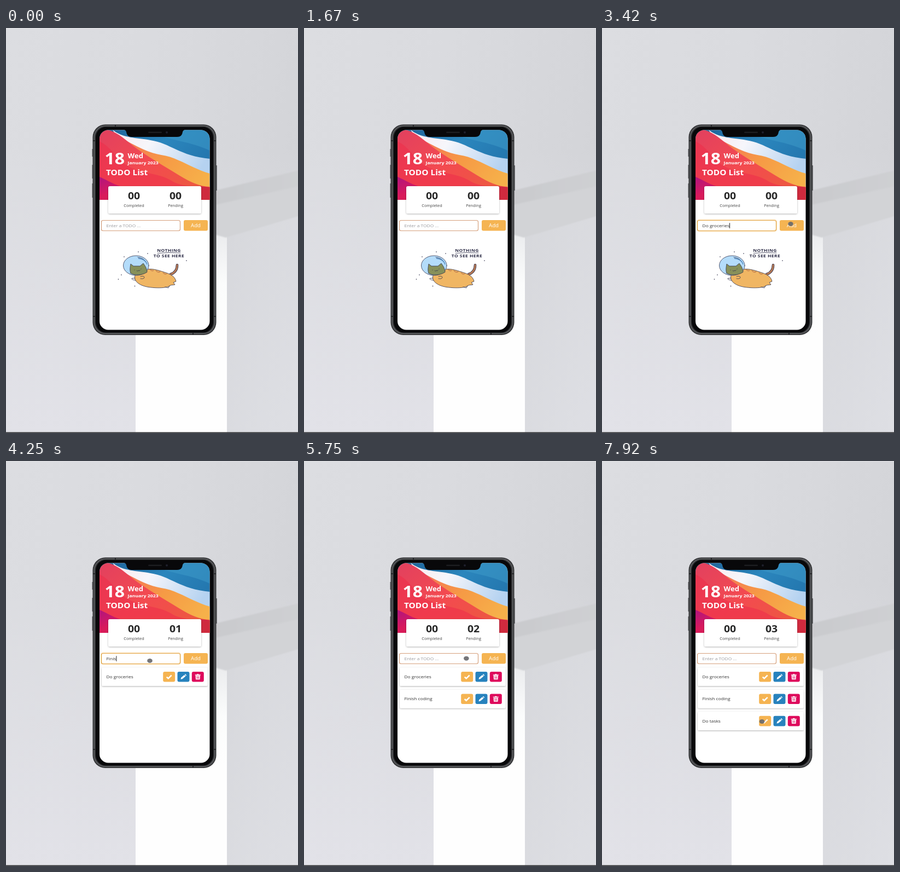
Animation, 534 px wide and 740 px high, one loop 8 s. Source, as an HTML page:

```html
<!DOCTYPE html>
<html lang="en">
<head>
<meta charset="utf-8">
<title>Todo list on a phone</title>
<style>
html, body { margin: 0; width: 100%; height: 100%; overflow: hidden; background: #dcdde1; }
svg { display: block; width: 534px; height: 740px; }
text { font-family: "Open Sans", "Noto Sans", sans-serif; white-space: pre; }
.ink { stroke: #34344e; stroke-width: .8; stroke-linecap: round; stroke-linejoin: round; }
.line { fill: none; }
</style>
</head>
<body>
<svg viewBox="0 0 534 740">
  <defs>
    <linearGradient id="wall" x2="1" y2=".35">
      <stop stop-color="#dcdde1"/><stop offset=".45" stop-color="#dadbdf"/><stop offset="1" stop-color="#d3d4d8"/>
    </linearGradient>
    <linearGradient id="low" x2="0" y2="1">
      <stop offset=".3" stop-color="#e2e2e8" stop-opacity="0"/><stop offset="1" stop-color="#e2e2e8"/>
    </linearGradient>
    <linearGradient id="beam" x2="1"><stop stop-color="#c9cacd"/><stop offset="1" stop-color="#cfd0d3"/></linearGradient>
    <linearGradient id="pillar" x2="1" y2="1"><stop stop-color="#d6d7db"/><stop offset="1" stop-color="#dedfe4"/></linearGradient>
    <linearGradient id="door" x2="0" y2="1"><stop stop-color="#ebecee"/><stop offset=".25" stop-color="#fbfcfc"/><stop offset=".5" stop-color="#fefefe"/></linearGradient>
    <linearGradient id="sky" x2="1" y2=".6"><stop stop-color="#1c5f95"/><stop offset=".5" stop-color="#2b86bd"/><stop offset="1" stop-color="#2273ab"/></linearGradient>
    <linearGradient id="foam" x2="1" y2=".4"><stop stop-color="#fbe9ee"/><stop offset=".4" stop-color="#f6f6fb"/><stop offset="1" stop-color="#b5d2f0"/></linearGradient>
    <linearGradient id="sun" x2="1" y2=".6"><stop stop-color="#f4705a"/><stop offset=".5" stop-color="#f69a45"/><stop offset="1" stop-color="#f6b14a"/></linearGradient>
    <linearGradient id="coral" x2="1" y2=".8"><stop stop-color="#e2405f"/><stop offset=".5" stop-color="#f34a50"/><stop offset="1" stop-color="#ec5a3e"/></linearGradient>
    <linearGradient id="berry" x2="1" y2=".5"><stop stop-color="#b0147f"/><stop offset=".35" stop-color="#d91a5c"/><stop offset="1" stop-color="#cf2a3e"/></linearGradient>
    <filter id="shade" x="-10%" y="-25%" width="120%" height="160%">
      <feDropShadow dx="0" dy="1" stdDeviation="1.6" flood-opacity=".3"/>
    </filter>
    <filter id="soft"><feGaussianBlur stdDeviation=".8"/></filter>
    <clipPath id="screen"><rect x="171" y="186.500" width="201.500" height="365" rx="16"/></clipPath>
  </defs>

  <!-- room -->
  <rect width="534" height="740" fill="url(#wall)"/>
  <rect width="534" height="740" fill="url(#low)"/>
  <path d="M380 376L404 383 534 343V740H404Z" fill="url(#pillar)"/>
  <path d="M237 376H404V740H237Z" fill="url(#door)"/>
  <g filter="url(#soft)">
    <path d="M370 300L540 259V342L402 383 370 374Z" fill="#d2d3d6"/>
    <path d="M370 300L540 259V288L370 326Z" fill="url(#beam)"/>
  </g>
  <path d="M0 0H534V1H0Z" fill="#e4e4e7"/>
  <path d="M0 738.6H534V740H0Z" fill="#333436"/>

  <!-- phone body -->
  <path d="M157.500 221h2v14h-2zM157.500 250h2v25h-2zM157.500 284h2v26h-2zM384 251h1.800v46h-1.800z" fill="#5a5b5e"/>
  <rect x="158.500" y="176.300" width="226" height="384.700" rx="23" fill="#353638"/>
  <rect x="161.300" y="178.800" width="220.400" height="379.600" rx="21" fill="none" stroke="#5f6063" stroke-width="1.600"/>
  <rect x="164" y="180.800" width="215" height="375.800" rx="19" fill="#08080a"/>
  <path d="M159 206h4M380 206h4M159 527h4M380 527h4M200 177v3M342 557v3" stroke="#1b1c1e" stroke-width="1.600"/>

  <g clip-path="url(#screen)">
    <rect x="171" y="186" width="202" height="366" fill="#fff"/>
    <!-- wallpaper -->
    <rect x="171" y="186" width="202" height="128" fill="url(#sky)"/>
    <path d="M262 186C290 206 330 204 373 224V186Z" fill="#3d9ac9" opacity=".55"/>
    <path d="M195 186C214 202 240 200 264 205 300 210 318 234 373 239V300H260Z" fill="url(#foam)"/>
    <path d="M212 202C238 215 256 227 284 232 314 236 338 256 373 266V314H290Z" fill="url(#sun)"/>
    <path d="M171 186H186C206 191 220 206 240 221 264 238 292 254 318 270 338 282 352 288 373 291V314H171Z" fill="url(#coral)"/>
    <path d="M171 207C196 219 202 243 228 255 258 268 284 266 306 281 328 292 350 288 373 290V314H171Z" fill="#ee2f4c" opacity=".6"/>
    <path d="M171 272C190 280 204 292 240 295 290 300 330 284 373 291V314H171Z" fill="url(#berry)"/>
    <g id="head"></g>
    <rect x="187" y="289" width="170" height="50" rx="3" fill="#fff" filter="url(#shade)"/>
    <g id="stats"></g>

    <!-- entry row -->
    <rect id="glow" x="173.500" y="350.500" width="146" height="21" rx="4" fill="none" stroke="#fbe3bd" stroke-width="1.400"/>
    <rect id="field" x="174.500" y="351.500" width="144" height="19" rx="3" fill="#fff" stroke-width="1.200"/>
    <rect x="325" y="351" width="44" height="19.500" rx="3" fill="#f5b452"/>
    <g id="entry"></g>
    <path id="caret" d="M0 356.2V366" stroke="#222" stroke-width="1"/>

    <!-- empty state -->
    <g id="empty">
      <path class="line" d="M301 450C310 447 313 441 313 433" stroke="#34344e" stroke-width="4.600" stroke-linecap="round"/>
      <path class="line" d="M300 450.500C310 447 313 441 313 433" stroke="#b87a55" stroke-width="3" stroke-linecap="round"/>
      <g class="ink">
        <path d="M236 452C232 461 243 471 261 473.500 279 476 296 475 301 470L309 469 306 465 311 463C309 453 299 449 289 446 277 442 266 439 257 441Z" fill="#f0b663"/>
        <path class="line" d="M236 457L230 457.500Q229 460 237 461M246 454Q253 452 253 456 252 459 246 458M291 473L297 475 299 471"/>
        <ellipse cx="237.800" cy="434" rx="23.300" ry="18" fill="#b4dcfa"/>
        <path d="M228 448C226 443 227 437 228 431L233 435H245L251 430C255 435 258 441 258 446 249 452 236 453 228 448Z" fill="#87905a"/>
        <path class="line" d="M235 442v.4M247 440v.4M239 443.500Q240.500 445.500 242 443 244 445 245 442.500M241 419Q252 420 256 428"/>
      </g>
      <path d="M263 441q4 4 7 2M274 443q4 5 8 2M287 447q4 4 7 2" fill="none" stroke="#c88450" stroke-width="1.600"/>
      <path d="M242 421Q255 422 258 432" fill="none" stroke="#5187bd" stroke-width="1.300"/>
      <path d="M259 412h0M242 409h0M211 451h0M205.500 459h0M235.500 471.500h0M330 425h0M216 418h0" stroke="#34344e" stroke-width="1.700" stroke-linecap="round"/>
      <path class="ink line" d="M277 411.500Q298 409.500 319 411" stroke-width="1.100"/>
    </g>
    <g id="list"></g>
    <ellipse id="pointer" rx="4.800" ry="4" fill="#68686b" opacity=".9"/>
  </g>

  <!-- notch -->
  <path d="M214 185H329Q323.500 186.500 323 190 322 199 313 199H230Q221 199 220 190 219.500 186.500 214 185Z" fill="#08080a"/>
  <rect x="260" y="189.500" width="25" height="2.600" rx="1.300" fill="#1d1e21"/>
  <circle cx="294" cy="190.800" r="2" fill="#1f202c"/>
</svg>
<script>
const $ = id => document.getElementById(id);
const LOOP = 8000, LEFT = 183.5;
const WIDE = 1.14; // the whole screen picture is a little wider than tall

// One task: field focus, typing start, time per letter, moment it is added.
const tasks = [
  { name: 'Do groceries', focus: 1830, start: 2050, step: 105, added: 3500 },
  { name: 'Finish coding', focus: 3780, start: 3830, step: 100, added: 5420 },
  { name: 'Do tasks', focus: 6080, start: 6300, step: 110, added: 7330 }
];

// Pointer stops: time, x, y
const stops = [
  [3210, 263, 365], [3420, 345, 358], [3560, 345, 358], [3780, 263, 365],
  [5060, 263, 365], [5300, 345, 356], [5490, 345, 356], [6000, 252, 365],
  [7100, 252, 365], [7250, 345, 361], [7420, 345, 361], [7900, 292.5, 476], [8000, 292.5, 476]
];

function text(parent, x, y, size, str, attrs = '') {
  $(parent).insertAdjacentHTML('beforeend',
    `<text transform="translate(${x} ${y}) scale(${WIDE} 1)" font-size="${size}" ${attrs}>${str}</text>`);
  return $(parent).lastElementChild;
}

const bold = 'font-weight="700"', mid = 'text-anchor="middle"';
const white = bold + ' fill="#fff"';
text('head', 180.5, 249, 28, '18', white);
text('head', 222.5, 238, 11.5, 'Wed', white);
text('head', 222.5, 248.8, 7.7, 'January 2023', white);
text('head', 183, 269, 13.5, 'TODO List', white);
text('stats', 234, 313, 17, '00', `${bold} ${mid} fill="#262626"`);
const pending = text('stats', 310, 313, 17, '00', `${bold} ${mid} fill="#262626"`);
text('stats', 234, 326.5, 6.4, 'Completed', mid + ' fill="#444"');
text('stats', 310, 326.5, 6.4, 'Pending', mid + ' fill="#444"');
text('entry', 347, 364.2, 8.5, 'Add', mid + ' fill="#fff"');
const typed = text('entry', LEFT, 363.8, 7.4, '');
const note = 'font-weight="700" fill="#2b2b45" letter-spacing=".4" ' + mid;
text('empty', 298, 408.6, 7.4, 'NOTHING', note);
text('empty', 298, 419.2, 7.4, 'TO SEE HERE', note);

// Icons are drawn around the centre of each button.
const icons = [
  ['#f5b452', '<path d="M-4.500 .3L-1.500 3 4.500-2.800" fill="none" stroke="#fff" stroke-width="2.500"/>'],
  ['#2782bd', '<path d="M-5 4.500L-4.300 1.500 1.500-3.400 4 -1 -2 3.900ZM2.200-4L3.500-5 5.700-2.700 4.700-1.600Z" fill="#fff"/>'],
  ['#de0a5c', '<path d="M-5-4H-2L-1.300-5H1.300L2-4H5V-2.600H-5ZM-4.300-2H4.300L3.700 5H-3.700Z" fill="#fff"/><path d="M-1.800-.7V3.600M0-.7V3.600M1.800-.7V3.600" stroke="#de0a5c" stroke-width=".8"/>']
];

const rows = tasks.map((task, i) => {
  const y = 394.3 + i * 40.4;
  const buttons = icons.map(([color, icon], k) =>
    `<g transform="translate(${298.2 + k * 26.3} ${y})"><rect x="-11" y="-9.300" width="22" height="18.600" rx="3" fill="${color}"/>${icon}</g>`);
  $('list').insertAdjacentHTML('beforeend',
    `<g id="row${i}"><rect x="175" y="${y - 16.8}" width="194" height="33.600" rx="2.500" fill="#fff" filter="url(#shade)"/>${buttons.join('')}</g>`);
  text('row' + i, LEFT, y + 2.7, 7.35, task.name, 'fill="#333"');
  return $('row' + i);
});

function pointerAt(t) {
  const i = stops.findIndex(s => s[0] > t);
  if (i < 1) return null;
  const [t0, x0, y0] = stops[i - 1], [t1, x1, y1] = stops[i];
  const u = (t - t0) / (t1 - t0), e = u * u * (3 - 2 * u);
  return [x0 + (x1 - x0) * e, y0 + (y1 - y0) * e];
}

const show = (el, on) => el.setAttribute('visibility', on ? 'visible' : 'hidden');

function draw(t) {
  const count = tasks.filter(k => t >= k.added).length;
  pending.textContent = '0' + count;
  rows.forEach((row, i) => show(row, i < count));
  show($('empty'), !count);

  const task = tasks.find(k => t >= k.focus && t < k.added);
  const letters = task ? Math.max(0, Math.floor((t - task.start) / task.step) + 1) : 0;
  const word = task ? task.name.slice(0, letters) : '';
  typed.textContent = word || 'Enter a TODO ...';
  typed.setAttribute('fill', word ? '#333' : '#9a9a9e');
  $('field').setAttribute('stroke', task ? '#e3a648' : '#d6a07c');
  show($('glow'), task);
  show($('caret'), task);
  const end = word ? typed.getComputedTextLength() * WIDE : 0;
  $('caret').setAttribute('transform', `translate(${LEFT + end + .6} 0)`);

  const p = pointerAt(t);
  show($('pointer'), p);
  if (p) $('pointer').setAttribute('transform', `translate(${p})`);
}

const begin = performance.now();
function tick() {
  draw((performance.now() - begin) % LOOP);
  requestAnimationFrame(tick);
}
tick();
</script>
</body>
</html>
```
